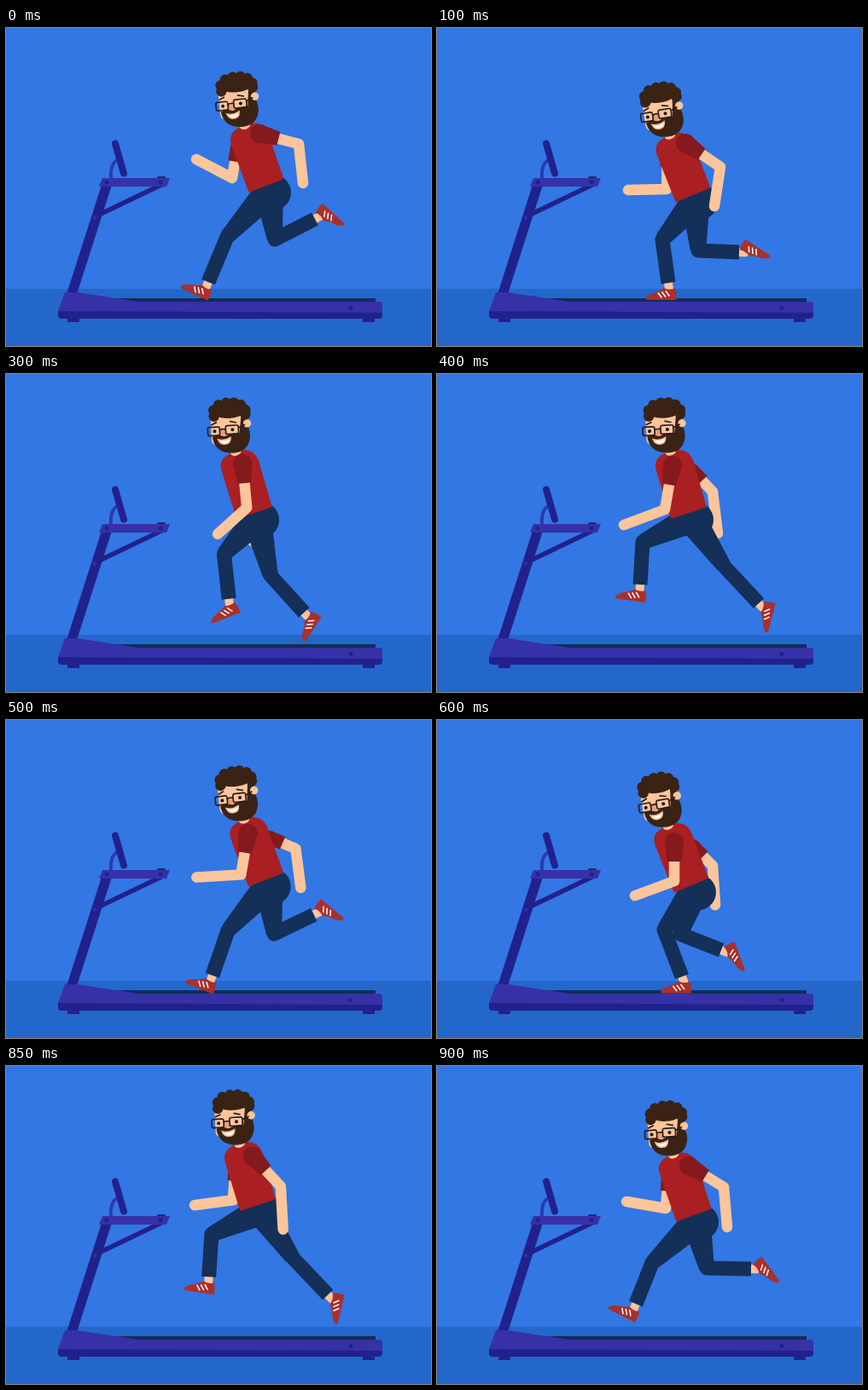
An HTML page that plays this animation: 498x373 px, repeating every 950 ms.

```html
<!DOCTYPE html>
<html lang="en">
<head>
<meta charset="utf-8">
<title>Treadmill run</title>
<style>
html, body { margin: 0; width: 100%; height: 100%; overflow: hidden; background: #3277e3; }
svg { display: block; width: 100vw; height: 100vh; }
.skin { fill: #fcc59b; }
.hair { fill: #3a2314; }
.pants { fill: #142f58; }
.shirt { fill: #aa1f21; }
.sleeve { fill: #84191e; }
.shoe { fill: #a9302b; }
.main { fill: #3631a7; }
.dark { fill: #21218c; }
.arm { fill: none; stroke: #fcc59b; stroke-width: 12.5; stroke-linejoin: round; stroke-linecap: round; }
.shin { fill: none; stroke: #142f58; stroke-width: 17; stroke-linejoin: round; }
.ankle { stroke: #fcc59b; stroke-width: 10; stroke-linecap: round; }
.laces { fill: none; stroke: #fff; stroke-width: 1.5; }
.specs { fill: none; stroke: #2b1c1c; stroke-width: 1.7; }
</style>
</head>
<body>
<svg viewBox="0 0 498 373" preserveAspectRatio="none">
  <defs>
    <g id="shoe">
      <path class="shoe" d="M7 -1Q9 5 8.500 13H-25Q-28 13 -27 10Q-24 6 -16 4Q-10 2 -6 -1Q1 2 7 -1Z"/>
      <path class="laces" d="M-13 4.500l4.500 6M-8.500 3.500l4.500 6M-4 2.500l4.500 6"/>
    </g>
  </defs>
  <rect width="498" height="373" fill="#3277e3"/>
  <rect y="306" width="498" height="67" fill="#2467cb"/>

  <g id="treadmill">
    <path d="M123 177C122 164 125 157 132 154" fill="none" stroke="#2a3bae" stroke-width="4"/>
    <path d="M128 135.500L138 170.500" stroke="#21218c" stroke-width="8" stroke-linecap="round"/>
    <path d="M109 219L184 183" stroke="#21218c" stroke-width="5.500"/>
    <path class="dark" d="M112 184H124L83 312H71Z"/>
    <circle cx="104" cy="222.500" r="2" fill="#3631a7"/>
    <path d="M176 177l2 -3h8l2 3z" fill="#182a66"/>
    <path class="main" d="M113 176H192L188 186H109Z"/>
    <circle class="dark" cx="118" cy="181" r="2.500"/>
    <circle class="dark" cx="181" cy="181" r="2.500"/>
    <path d="M120 317H433V322H120Z" fill="#132b58"/>
    <path class="dark" d="M72 340h14v5h-14zM418 340h14v5h-14zM61 331H441V337Q441 341 437 341H65Q61 341 61 337Z"/>
    <path class="main" d="M69 310H83L155 321H438Q441 321 441 324V334L61 332Z"/>
    <circle class="dark" cx="404" cy="328.500" r="2.500"/>
  </g>

  <g id="man">
    <g id="farArm"></g>
    <g id="farLeg"></g>
    <g id="nearLeg"></g>
    <circle class="pants" cx="8" cy="8" r="21"/>
    <g id="torso">
      <path class="shirt" d="M-22 0L-21 -58Q-21 -74 -5 -75H6Q22 -74 24 -58L22 0Z"/>
      <ellipse class="skin" cx="2" cy="-75" rx="6.500" ry="4.500"/>
    </g>
    <g id="nearArm"></g>
    <g id="head">
      <rect class="skin" x="-22" y="-16" width="41" height="38" rx="5"/>
      <path class="hair" d="M-21 13Q-14 9 -7 13Q2 9 11 10L14 -12H20V0Q24 8 23 16Q20 33 2 33Q-19 32 -21 13Z"/>
      <circle class="skin" cx="20.500" cy="-1" r="4.700"/>
      <ellipse class="hair" cx="0" cy="-17" rx="20" ry="9"/>
      <g id="curls" class="hair"></g>
      <ellipse cx="-8.500" cy="9" rx="4" ry="3.300" fill="#f09c78"/>
      <path d="M-14 16.500Q-7 19 0 15Q0 22 -7 22Q-12 22 -14 16.500Z" fill="#fff" stroke="#fcc59b" stroke-width="1.800"/>
      <path class="specs" d="M-22 -1L-15 -4M0 -4.500L8 -2.500M-12 5.500Q-8.500 3.500 -5 5M10 3.500L18 0"/>
      <rect class="specs" x="-26" y="1.500" width="14" height="10" rx="2"/>
      <rect class="specs" x="-5" y="0.500" width="15" height="10" rx="2"/>
      <circle cx="-18" cy="6.500" r="2" fill="#1d1414"/>
      <circle cx="3" cy="5.500" r="2" fill="#1d1414"/>
    </g>
  </g>
</svg>
<script>
const LOOP = 950, STEP = 50, CYCLE = 19, HALF = CYCLE / 2;
const $ = id => document.getElementById(id);

// step -> stride phase
const pace = [[0, 0], [4, 4], [8, 7.5], [12, 12.2], [15, 15.1], [18, 18], [19, 19]];

// phase, hem x, hem y, torso tilt, head tilt
const body = [
  [0, 305, 185, -21, -6], [2, 300, 196, -22.5, -9], [2.7, 298, 194, -22.7, -10],
  [4, 294, 188, -22, -10], [5.6, 291, 164, -18.5, -3], [7.5, 295, 163, -18, -3],
  [8.5, 301, 175, -20, -4]
];

// phase, knee, cuff, foot angle (relative to the hem)
const leg = [
  [0, -46, 60, -68, 113, 25], [2, -36, 52, -29, 103, 0], [2.7, -32, 52, -11, 107, 0],
  [4, -23, 54, 5, 112, 0], [5.6, 16, 73, 55, 117, -54], [7.5, 41, 62, 82, 106, -76],
  [8.5, 15, 62, 67, 63, -126], [9.5, 10, 63, 57, 39, -137], [11.5, 6, 65, 54, 67, -147],
  [12.2, -13, 57, 35, 76, -110], [13.5, -17, 54, 12, 84, -108], [15.1, -34, 49, -27, 101, -26],
  [17, -54, 34, -57, 84, 8], [18, -49, 56, -68, 104, 27]
];

// phase, shoulder, elbow, hand
const nearArm = [
  [0, -8, -61, 38, -49, 43, -3], [2, -9, -61, 32, -33, 25, 13], [4, -9, -60, 13, -12, -6, 30],
  [7.5, -19, -56, -28, -4, -76, 14], [9.5, -21, -55, -30, -6, -82, -3],
  [12.2, -20, -51, -20, -5, -66, 12], [15.1, -9, -57, 8, -5, 4, 48], [18, -6, -58, 35, -33, 39, 14]
];
const farArm = [
  [0, -34, -45, -40, -9, -82, -31], [2, -30, -50, -31, -7, -76, -6], [4, -18, -50, -12, -7, -43, 33],
  [7.5, 4, -50, 28, -25, 34, 24], [9.5, 4, -50, 35, -37, 41, 9],
  [12.2, 2, -46, 25, -23, 28, 23], [15.1, -18, -46, -19, -4, -56, 27], [18, -30, -45, -33, -8, -79, -16]
];

// smooth periodic curve through the keys
function sample(keys, period, t) {
  t = ((t % period) + period) % period;
  const n = keys.length;
  const at = i => {
    const turn = Math.floor(i / n), key = keys[i - turn * n];
    return [key[0] + turn * period, ...key.slice(1)];
  };
  let i = n - 1;
  while (keys[i][0] > t) i--;
  const [a, b, c, d] = [at(i - 1), at(i), at(i + 1), at(i + 2)];
  const h = c[0] - b[0], s = (t - b[0]) / h, s2 = s * s, s3 = s2 * s;
  return b.slice(1).map((v, k) => {
    const j = k + 1;
    const m0 = (c[j] - a[j]) / (c[0] - a[0]) * h;
    const m1 = (d[j] - b[j]) / (d[0] - b[0]) * h;
    return v * (2 * s3 - 3 * s2 + 1) + m0 * (s3 - 2 * s2 + s) + c[j] * (3 * s2 - 2 * s3) + m1 * (s3 - s2);
  });
}

function phaseAt(step) {
  const i = pace.findIndex(p => p[0] > step);
  const [a, b] = [pace[i - 1], pace[i]];
  return a[1] + (b[1] - a[1]) * (step - a[0]) / (b[0] - a[0]);
}

function toward(x, y, px, py, dist) {
  const len = Math.hypot(px - x, py - y) || 1;
  return [x + (px - x) / len * dist, y + (py - y) / len * dist];
}

// quad narrowing from radius r to radius q
function taper(x, y, px, py, r, q) {
  const len = Math.hypot(px - x, py - y) || 1;
  const nx = (y - py) / len, ny = (px - x) / len;
  return `M${x + nx * r} ${y + ny * r}L${px + nx * q} ${py + ny * q}` +
    `L${px - nx * q} ${py - ny * q}L${x - nx * r} ${y - ny * r}Z`;
}

function drawLeg(id, t) {
  const [kx, ky, cx, cy, turn] = sample(leg, CYCLE, t);
  const hx = 3, hy = 7;
  const [jx, jy] = toward(cx, cy, 2 * cx - kx, 2 * cy - ky, 7);
  $(id).innerHTML =
    `<path class="ankle" d="M${cx} ${cy}L${jx} ${jy}"/>` +
    `<use href="#shoe" transform="translate(${jx} ${jy}) rotate(${turn})"/>` +
    `<path class="pants" d="${taper(hx, hy, kx, ky, 17, 9)}"/>` +
    `<path class="shin" d="M${hx} ${hy}L${kx} ${ky}L${cx} ${cy}"/>`;
}

function drawArm(id, keys, t, r) {
  const [sx, sy, ex, ey, hx, hy] = sample(keys, CYCLE, t);
  const [cx, cy] = toward(sx, sy, ex, ey, r * 2.1);
  $(id).innerHTML =
    `<path class="arm" d="M${sx} ${sy}L${ex} ${ey}L${hx} ${hy}"/>` +
    `<circle class="sleeve" cx="${sx}" cy="${sy}" r="${r}"/>` +
    `<path class="sleeve" d="${taper(sx, sy, cx, cy, r, 8)}"/>`;
}

function draw(ms) {
  const t = phaseAt(Math.floor(ms % LOOP / STEP));
  const [x, y, tilt, nod] = sample(body, HALF, t);
  const a = tilt * Math.PI / 180, hx = 5, hy = -107;
  const px = hx * Math.cos(a) - hy * Math.sin(a), py = hx * Math.sin(a) + hy * Math.cos(a);
  $("man").setAttribute("transform", `translate(${x} ${y})`);
  $("torso").setAttribute("transform", `rotate(${tilt})`);
  $("head").setAttribute("transform", `translate(${px} ${py}) rotate(${nod})`);
  drawArm("farArm", farArm, t, 8);
  drawArm("nearArm", nearArm, t, 11);
  drawLeg("farLeg", t - HALF);
  drawLeg("nearLeg", t);
}

const curls = [[-18, -11], [-18, -18], [-12, -24], [-3, -26], [6, -26], [14, -23], [19, -17], [19, -12]];
$("curls").innerHTML = curls.map(([x, y]) => `<circle cx="${x}" cy="${y}" r="6.200"/>`).join("");

const start = performance.now();
function tick() {
  draw(performance.now() - start);
  requestAnimationFrame(tick);
}
tick();
</script>
</body>
</html>
```
